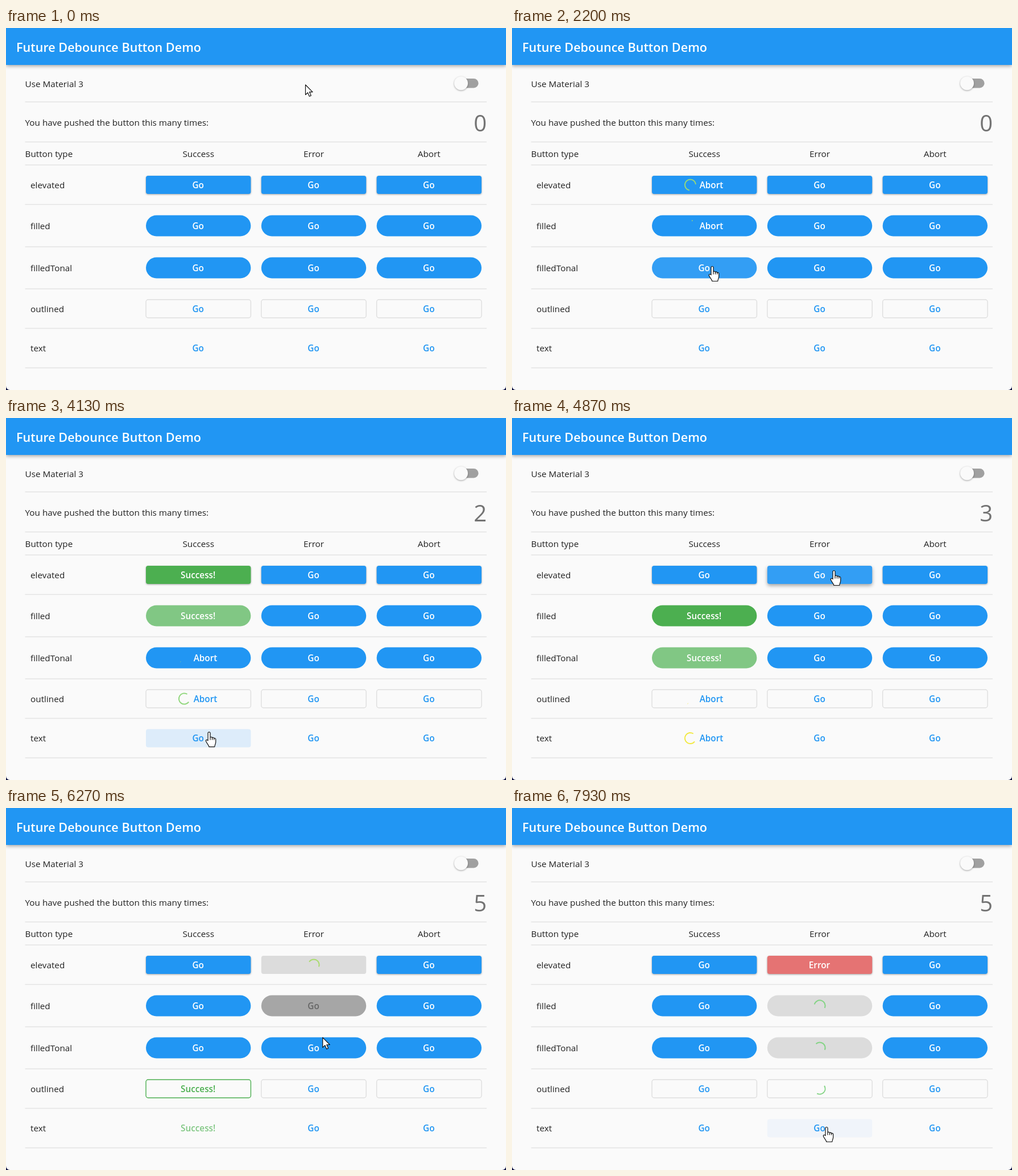
An HTML page that plays this animation: 879 px wide and 637 px high, repeating every 8000 ms.

```html
<!DOCTYPE html>
<html lang="en">
<head>
<meta charset="utf-8">
<title>Future Debounce Button Demo</title>
<style>
html, body { margin: 0; width: 100%; height: 100%; overflow: hidden; background: #0b1040; }
svg { display: block; width: 879px; height: 637px; font: 15.3px "Open Sans", "Noto Sans", sans-serif; }
.label { fill: #222; }
.bold { font-weight: 600; }
.mid { text-anchor: middle; }
#bar { filter: drop-shadow(0 2px 3px rgba(0,0,0,.35)); }
#thumb { filter: drop-shadow(0 1px 1.5px rgba(0,0,0,.35)); }
</style>
</head>
<body>
<svg id="stage" viewBox="0 0 879 637">
  <defs id="defs"></defs>
  <path d="M0 0H879V630a7 7 0 0 1-7 7H7a7 7 0 0 1-7-7z" fill="#fafafa"/>
  <rect id="bar" width="879" height="65" fill="#2196f3"/>
  <text class="bold" x="18" y="42" font-size="21.6" fill="#fff">Future Debounce Button Demo</text>
  <g id="table"></g>
  <rect x="794" y="89" width="36.5" height="16.5" rx="8.2" fill="#a0a0a0"/>
  <circle id="thumb" cx="800" cy="97.3" r="12" fill="#fafafa"/>
  <text id="count" x="845" y="181.5" font-size="40" text-anchor="end" fill="#737373">0</text>
  <g id="buttons"></g>
  <g id="cursor" fill="#fff" stroke="#111" stroke-width="1.2" stroke-linejoin="round">
    <path id="arrow" d="M.5 1V18.5l4-3.8 2.8 6.5 3-1.3-2.8-6.3H13z"/>
    <path id="hand" d="M-2 15.5V2.5a2 2 0 0 1 4 0v8c.5-2 3.5-1.6 3.5.6c.6-1.6 3.2-1.2 3.2 1c.6-1.4 3-.9 3 1.2v5c0 3-1.7 4.5-2 8.2H-.2c0-2.5-2.6-4.2-5-9c-1.4-2.9.8-4.4 3.2-2zM2 10.500v4M5.500 11v3.500M8.700 12v2.500"/>
  </g>
</svg>
<script>
const NS = 'http://www.w3.org/2000/svg', LOOP = 8000;
const BLUE = '#2196f3', WIDTH = 184.4, COLS = [246, 448.8, 651.6];
const ROWS = [
  { name: 'elevated', y: 260, h: 32, r: 4, solid: true },
  { name: 'filled', y: 329.5, h: 37, r: 18.5, solid: true },
  { name: 'filledTonal', y: 403.5, h: 37, r: 18.5, solid: true },
  { name: 'outlined', y: 478, h: 32, r: 4 },
  { name: 'text', y: 547.5, h: 32, r: 4 }
];
// When each button starts loading, by column and row
const STARTS = [[1440, 2130, 2770, 3580, 4315], [5400, 6300, 7050, 7680], []];
const DELAY = 350, FADE = 45, LOAD = 1780, HOLD = 1040, DARK = 130;
const DONE = [
  { label: 'Success!', light: '#81c784', dark: '#4caf50' },
  { label: 'Error', light: '#e57373', dark: '#f44336' }
];
// Pointer stops: time, x, y
const PATH = [
  [0, 526, 99], [150, 526, 99], [850, 352, 284], [1110, 352, 285], [1400, 353, 334],
  [1700, 353, 350], [1850, 353, 350], [2200, 352, 419], [2480, 352, 419], [3150, 350, 497],
  [3270, 350, 497], [3500, 350, 504], [3860, 349, 563], [4050, 349, 563], [4750, 566, 268],
  [4870, 566, 268], [5110, 563, 275], [5600, 555, 355], [5960, 555, 360], [6500, 557, 430],
  [6720, 557, 430], [7000, 563, 492], [7350, 562, 497], [7850, 553, 561], [LOOP, 553, 561]
];

const $ = id => document.getElementById(id);
const clamp = v => Math.max(0, Math.min(1, v));

function add(parent, tag, attrs, text) {
  const el = parent.appendChild(document.createElementNS(NS, tag));
  set(el, attrs);
  if (text) el.textContent = text;
  return el;
}
function set(el, attrs) {
  for (const k in attrs) el.setAttribute(k, attrs[k]);
}

function pointer(t) {
  const i = Math.max(1, PATH.findIndex(p => p[0] > t));
  const [a, b] = [PATH[i - 1], PATH[i]];
  const u = clamp((t - a[0]) / (b[0] - a[0])), k = u * u * (3 - 2 * u);
  return [a[1] + (b[1] - a[1]) * k, a[2] + (b[2] - a[2]) * k];
}

const inside = (b, [x, y]) =>
  x >= b.x && x <= b.x + WIDTH && y >= b.row.y && y <= b.row.y + b.row.h;

// Cubic bezier (.4, 0, .2, 1)
function ease(x) {
  x = clamp(x);
  let lo = 0, hi = 1;
  for (let i = 0; i < 18; i++) {
    const s = (lo + hi) / 2, q = 1 - s;
    if (1.2 * q * q * s + .6 * q * s * s + s * s * s < x) lo = s; else hi = s;
  }
  return 3 * (1 - lo) * lo * lo + lo ** 3;
}

function spinnerPath(age, cx, cy) {
  const u = age / 1333 % 1, head = ease(u * 2), tail = ease(u * 2 - 1);
  const from = Math.PI * (-.5 + tail * 1.5 + age / 2222 * 2 + u * .5);
  const sweep = Math.max((head - tail) * 1.5 * Math.PI, .06);
  const at = a => `${cx + 9.6 * Math.cos(a)} ${cy + 9.6 * Math.sin(a)}`;
  return `M${at(from)}A9.6 9.6 0 ${+(sweep > Math.PI)} 1 ${at(from + sweep)}`;
}

function spinnerColor(t) {
  const k = (t + 878) / 1950 % 1;
  const mix = (a, b) => Math.round(a + (b - a) * k);
  return `rgb(${mix(0, 255)},${mix(188, 235)},${mix(212, 59)})`;
}

function stateAt(b, t) {
  const age = t - b.start;
  if (!(age >= -FADE)) return 'ready';
  if (age < 0) return 'fade';
  if (age < LOAD) return b.col ? 'busy' : 'abort';
  if (age < LOAD + HOLD - DARK) return 'light';
  return age < LOAD + HOLD ? 'dark' : 'ready';
}

// Fixed parts
const label = (x, y, text, cls = '') =>
  add($('table'), 'text', { x, y, class: 'label ' + cls }, text);
for (const y of [130, 200.5, 241, 310.5, 385, 459, 528.5, 598])
  add($('table'), 'rect', { x: 33.5, y: y - .75, width: 811.5, height: 1.5, fill: '#e3e3e3' });
label(33.5, 103.5, 'Use Material 3');
label(33.5, 171.5, 'You have pushed the button this many times:');
label(33.5, 227, 'Button type');
['Success', 'Error', 'Abort'].forEach((s, i) => label(COLS[i] + WIDTH / 2, 227, s, 'mid'));

const buttons = [];
ROWS.forEach((row, i) => {
  label(43, row.y + row.h / 2 + 5.5, row.name);
  const box = { width: WIDTH, height: row.h, rx: row.r };
  add(add($('defs'), 'clipPath', { id: 'clip' + i }), 'rect', box);
  COLS.forEach((x, col) => {
    const g = add($('buttons'), 'g', { transform: `translate(${x} ${row.y})` });
    const b = { row, x, col, start: STARTS[col][i] };
    b.rect = add(g, 'rect', box);
    b.ripple = add(add(g, 'g', { 'clip-path': `url(#clip${i})` }), 'circle',
      { fill: row.solid ? '#fff' : BLUE });
    b.text = add(g, 'text', { y: row.h / 2 + 5.6, class: 'bold mid' });
    b.arc = add(g, 'path', { fill: 'none', 'stroke-width': 2 });
    buttons.push(b);
  });
});

function drawButton(b, t) {
  const { row } = b, state = stateAt(b, t), done = DONE[b.col];
  const live = state === 'ready' || state === 'abort';
  const hover = live && inside(b, pointer(Math.max(0, t - 100)));
  const finished = state === 'light' || state === 'dark';
  const loading = state === 'busy' || state === 'abort';

  let color = hover && row.solid ? '#339ef4' : BLUE;
  if (state === 'fade') color = '#a6a6a6';
  if (state === 'busy') color = '#dcdcdc';
  if (finished) color = done[state];

  const outlined = row.name === 'outlined';
  set(b.rect, {
    fill: row.solid ? color : hover ? '#f0f4fa' : 'none',
    stroke: outlined ? (finished ? color : '#dedede') : 'none',
    'stroke-width': 1.4
  });
  const raised = row.name === 'elevated' && (live || finished);
  b.rect.style.filter = hover && (raised || row.name === 'filled')
    ? `drop-shadow(0 ${raised ? 3 : 1}px ${raised ? 3 : 1}px rgba(0,0,0,.35))`
    : raised ? 'drop-shadow(0 1.5px 1.5px rgba(0,0,0,.35))' : 'none';

  b.text.textContent = finished ? done.label
    : state === 'abort' ? 'Abort' : state === 'busy' ? '' : 'Go';
  set(b.text, {
    x: WIDTH / 2 + (state === 'abort' ? 12.3 : -.5),
    fill: state === 'fade' ? '#666' : row.solid ? '#fff' : color
  });

  set(b.arc, {
    d: loading ? spinnerPath(t - b.start, state === 'abort' ? 67.5 : WIDTH / 2, row.h / 2) : '',
    stroke: spinnerColor(t)
  });

  const click = b.start - DELAY, u = (t - click) / 300;
  const on = u >= 0 && u < 1;
  b.ripple.style.display = on ? '' : 'none';
  if (on) {
    const [x, y] = pointer(click);
    set(b.ripple, {
      cx: x - b.x, cy: y - row.y, r: 15 + 180 * u,
      opacity: (row.solid ? .22 : .1) * Math.min(1, u * 5, (1 - u) * 2)
    });
  }
}

function draw(t) {
  buttons.forEach(b => drawButton(b, t));
  $('count').textContent = STARTS[0].filter(s => t >= s + LOAD).length;
  const pos = pointer(t);
  const over = buttons.some(b => inside(b, pos) && stateAt(b, t) !== 'busy');
  set($('cursor'), { transform: `translate(${pos})` });
  $('hand').style.display = over ? '' : 'none';
  $('arrow').style.display = over ? 'none' : '';
}

function tick() {
  draw(performance.now() % LOOP);
  requestAnimationFrame(tick);
}
tick();
</script>
</body>
</html>
```
